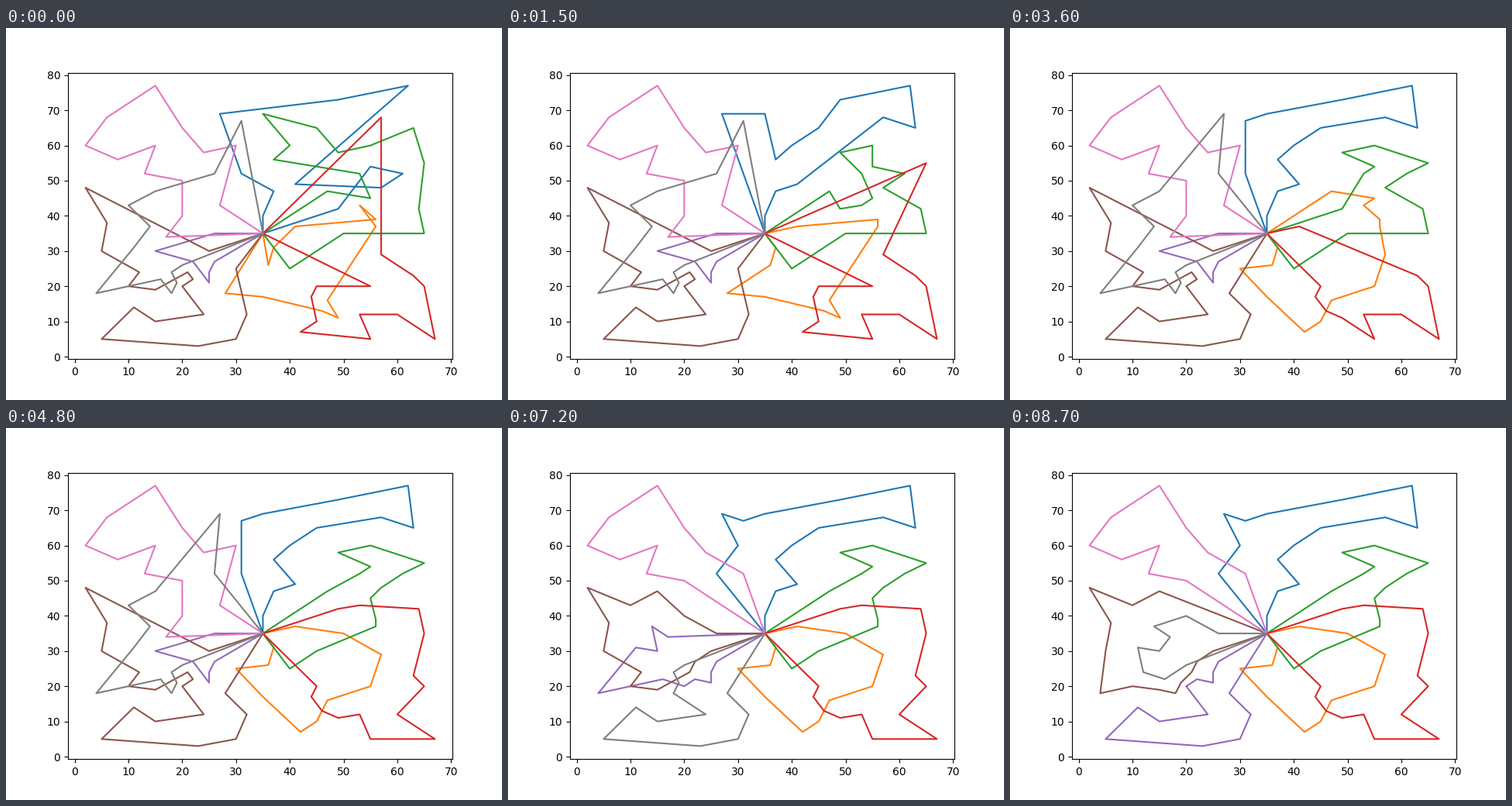
These frames come from a looping animation (640 px wide and 480 px high, 9 s). A matplotlib script:

```python
from math import dist

import matplotlib.pyplot as plt
from matplotlib.animation import FuncAnimation

STEP_MS = 300
DEPOT = (35, 35)
COLORS = dict(blue="C0", orange="C1", green="C2", red="C3",
              purple="C4", brown="C5", pink="C6", gray="C7")

routes = {}
states = []


def tour(name, *stops):
    routes[name] = [DEPOT, *stops, DEPOT]


def move(name, a, b=None, after=None):
    """Take stops a..b out of their route and put them into the named one,
    where they add the least length unless a place is given."""
    src = next(r for r in routes.values() if a in r)
    i, j = sorted((src.index(a), src.index(b or a)))
    seg = src[i:j + 1]
    del src[i:j + 1]
    if seg[0] != a:
        seg.reverse()
    r = routes[name]

    def extra(option):
        k, s = option
        return dist(r[k - 1], s[0]) + dist(s[-1], r[k]) - dist(r[k - 1], r[k])

    if after:
        k = r.index(after) + 1
    else:
        k, seg = min(((k, s) for k in range(1, len(r))
                      for s in (seg, seg[::-1])), key=extra)
    r[k:k] = seg


def flip(name, a, b):
    """Reverse the stretch from a to b."""
    r = routes[name]
    i, j = r.index(a), r.index(b) + 1
    r[i:j] = r[i:j][::-1]


def cross(n1, a, n2, b):
    """Swap the tails of two routes after stops a and b."""
    r, s = routes[n1], routes[n2]
    i, j = r.index(a) + 1, s.index(b) + 1
    routes[n1], routes[n2] = r[:i] + s[j:], s[:j] + r[i:]


def snap():
    states.append({name: list(r) for name, r in routes.items()})


# starting tours
tour("blue", (35, 40), (37, 47), (31, 52), (27, 69), (49, 73), (62, 77),
     (41, 49), (57, 48), (61, 52), (55, 54), (49, 42))
tour("orange", (36, 26), (37, 31), (41, 37), (56, 39), (53, 43), (56, 37),
     (47, 16), (49, 11), (46, 13), (35, 17), (28, 18))
tour("green", (40, 25), (45, 30), (50, 35), (65, 35), (64, 42), (65, 55),
     (63, 65), (55, 60), (49, 58), (45, 65), (35, 69), (40, 60), (37, 56),
     (53, 52), (55, 45), (47, 47))
tour("red", (57, 68), (57, 29), (63, 23), (65, 20), (67, 5), (60, 12),
     (53, 12), (55, 5), (42, 7), (45, 10), (44, 17), (45, 20), (55, 20))
tour("purple", (26, 27), (25, 24), (25, 21), (22, 27), (15, 30), (26, 35))
tour("brown", (25, 30), (2, 48), (6, 38), (5, 30), (12, 24), (10, 20),
     (15, 19), (21, 24), (22, 22), (20, 20), (24, 12), (15, 10), (11, 14),
     (5, 5), (23, 3), (30, 5), (32, 12), (30, 25))
tour("pink", (27, 43), (30, 60), (24, 58), (20, 65), (15, 77), (6, 68),
     (2, 60), (8, 56), (15, 60), (13, 52), (20, 50), (20, 40), (17, 34))
tour("gray", (20, 26), (18, 24), (19, 21), (18, 18), (16, 22), (4, 18),
     (11, 31), (14, 37), (10, 43), (15, 47), (26, 52), (31, 67))
snap()

# upper right: blue, green and red trade stops
move("green", (57, 48), (55, 54))
move("green", (49, 42))
flip("blue", (31, 52), (41, 49))
snap()
move("blue", (35, 69))
move("blue", (45, 65), (37, 56), after=(49, 73))
snap()
move("blue", (63, 65))
snap()
move("blue", (57, 68))
move("red", (65, 55))
move("green", (57, 48), (55, 54))
snap()
move("green", (53, 43))
move("orange", (36, 26), (37, 31))
snap()
move("blue", (31, 67))
move("gray", (27, 69))
snap()
move("blue", (45, 65), (37, 56))
snap()

# right side: green, orange and red
move("green", (65, 55))
move("green", (55, 54))
move("red", (41, 37))
move("red", (55, 20))
snap()
move("orange", (47, 47))
move("orange", (55, 45), (53, 43))
snap()
move("orange", (30, 25))
move("brown", (28, 18))
snap()
move("red", (49, 11), (46, 13))
move("orange", (42, 7), (45, 10))
snap()
move("orange", (57, 29), (55, 20))
snap()
move("green", (47, 47))
move("red", (53, 43))
snap()
move("green", (55, 45), (56, 37))
move("red", (53, 12))
move("red", (67, 5))
snap()
move("orange", (41, 37))
move("red", (49, 42))
snap()
move("red", (64, 42), (65, 35))
move("orange", (50, 35))
snap()

# left side: purple, brown, pink and gray
move("blue", (27, 69))
snap()
cross("purple", (25, 21), "brown", (21, 24))
flip("brown", (2, 48), (22, 27))
snap()
move("brown", (10, 43), (15, 47))
move("gray", (15, 30))
snap()
move("pink", (26, 52), after=(20, 50))
move("gray", (26, 35))
snap()
move("brown", (20, 40), (17, 34))
snap()
move("pink", (31, 52))
move("blue", (30, 60))
move("blue", (26, 52))
move("pink", (27, 43))
snap()
move("gray", (17, 34))
move("brown", (26, 35))
snap()
for _ in range(2):
    cross("purple", (20, 20), "gray", (18, 18))
    snap()
cross("brown", (10, 20), "gray", (16, 22))
snap()
move("brown", (19, 21), (18, 18))
snap()
move("brown", (20, 40), (26, 35))
move("brown", (17, 34))
snap()
cross("brown", (4, 18), "gray", (12, 24))
snap()

fig, ax = plt.subplots(figsize=(6.4, 4.8), dpi=100)
lines = {name: ax.plot(*zip(*states[0][name]), color=c)[0]
         for name, c in COLORS.items()}


def draw(i):
    for name, line in lines.items():
        line.set_data(*zip(*states[i][name]))
    return list(lines.values())


anim = FuncAnimation(fig, draw, frames=len(states), interval=STEP_MS,
                     repeat=True, repeat_delay=0)
plt.show()
```
